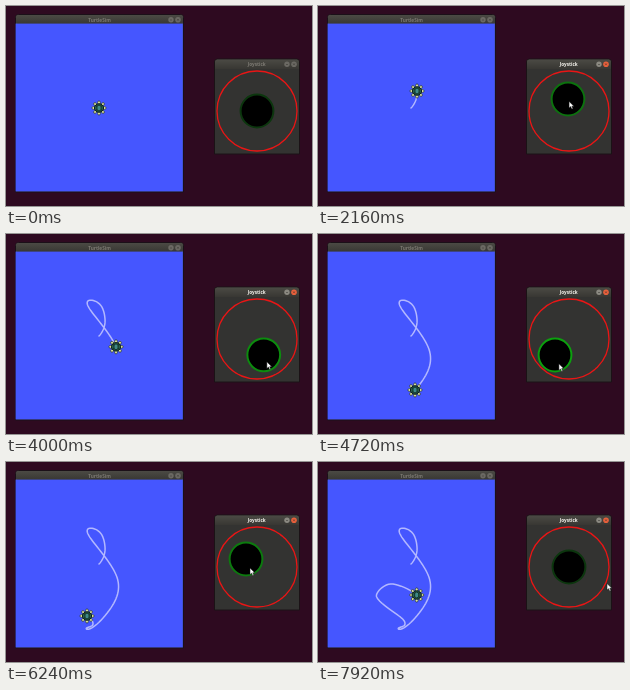
An HTML page that plays this animation: 306 by 200 pixels, repeating every 8 s.

```html
<!DOCTYPE html>
<html lang="en">
<head>
<meta charset="utf-8">
<title>Joystick control</title>
<style>
  html, body { margin: 0; width: 100%; height: 100%; overflow: hidden; background: #2e0a20; }
  svg { display: block; width: 306px; height: 200px; }
  text { font: bold 4.7px "Open Sans", "Noto Sans", sans-serif; text-anchor: middle; fill: #7d7a73; }
  .btn { fill: #6b6963; }
  .sign { fill: none; stroke: #302f2b; stroke-width: .5; }
  .focus text { fill: #f4f2ec; }
  .focus .btn { fill: #8b8981; }
  .focus .close { fill: #e8603c; }
</style>
</head>
<body>
<svg viewBox="0 0 306 200">
  <defs>
    <linearGradient id="bar" x2="0" y2="1">
      <stop offset="0" stop-color="#4b4a44"/>
      <stop offset="1" stop-color="#383733"/>
    </linearGradient>
  </defs>

  <rect width="306" height="200" fill="#2e0a20"/>

  <g id="sim">
    <path d="M9.5 186V11.5q0-3 3-3h162q3 0 3 3V186z" fill="url(#bar)" stroke="#1b1018"/>
    <rect x="10" y="9" width="167" height="9" rx="2" fill="url(#bar)"/>
    <rect x="9.6" y="17.6" width="167.2" height="167.8" fill="#4556ff"/>
    <text x="93.5" y="15.6">TurtleSim</text>
    <g class="buttons" transform="translate(172 13.8)"></g>
  </g>

  <polyline id="trail" fill="none" stroke="#b3b8ff" stroke-width="1.5" stroke-linejoin="round" stroke-linecap="round"/>

  <g id="turtle">
    <g id="legs" fill="#dfe5a6" stroke="#1c2c1a" stroke-width=".6"></g>
    <ellipse rx="4.6" ry="4.2" fill="#24604f" stroke="#0e1f18" stroke-width="1"/>
    <path d="M-2 -1.8L0 -3 2 -1.8V1.8L0 3-2 1.8zM-2 -1.8l-2-1M2 -1.8l2-1M-2 1.8l-2 1M2 1.8l2 1" fill="#3f8a86" stroke="#0e241e" stroke-width=".8"/>
  </g>

  <g id="pad">
    <path d="M208.5 148V56q0-3 3-3h79q3 0 3 3v92z" fill="#333331" stroke="#1b1216"/>
    <path d="M209 63v-7q0-2.5 2.5-2.5h79q2.5 0 2.5 2.5v7z" fill="url(#bar)"/>
    <text x="250.7" y="60">Joystick</text>
    <g class="buttons" transform="translate(288 58.3)"></g>
    <circle cx="251" cy="105" r="40" fill="none" stroke="#ea1515" stroke-width="1.3"/>
    <circle id="knob" r="16.4" fill="#000" stroke-width="2"/>
  </g>

  <path id="cursor" d="M0 0V6.6L1.6 5.2 2.7 7.7 3.9 7.1 2.8 4.8H4.9z" fill="#fff" stroke="#111" stroke-width=".5"/>
</svg>
<script>
const LOOP = 8000, STEP = 80, ENTER = 480, PRESS = 1200, RELEASE = 7680;
const GAIN = 0.004; // turtle px per ms for each px of knob offset
const HOME = [251, 105], OUTSIDE = [318, 130], EXIT = [289, 121.5];
const $ = id => document.getElementById(id);

// Time, turtle x, y, knob offset x, y
const keys = [
  [1500, 93, 102, 0, 0],
  [2160, 99, 85, -1, -12],
  [2850, 87, 66.5, -8, -2],
  [3280, 82, 72, 4, 8.5],
  [4100, 112, 119, 3, 15],
  [4720, 97, 156, -14, 16],
  [5200, 80.5, 167, -2, -2],
  [5850, 87, 162, 0, -3.5],
  [6240, 81, 154, -11, -8],
  [6900, 58.5, 134.5, -2, -6],
  [7360, 75, 122, 14, 2],
  [RELEASE, 98.7, 133, 18, 15]
];

const clamp = v => Math.min(1, Math.max(0, v));
const mix = (a, b, u) => a.map((v, i) => v + (b[i] - v) * u);
const place = (el, [x, y]) => el.setAttribute("transform", `translate(${x} ${y})`);

// The knob sets the turtle's velocity, so its offset is the slope of the path
function state(time) {
  const t = Math.min(RELEASE, Math.max(keys[0][0], time));
  const i = Math.max(1, keys.findIndex(k => k[0] >= t));
  const a = keys[i - 1], b = keys[i], span = b[0] - a[0], u = (t - a[0]) / span;
  const pos = [], push = [];
  for (const c of [1, 2]) {
    const d = b[c] - a[c], m = a[c + 2] * GAIN * span, n = b[c + 2] * GAIN * span;
    const p = 3 * d - 2 * m - n, q = m + n - 2 * d;
    pos.push(a[c] + u * (m + u * (p + u * q)));
    push.push((m + u * (2 * p + 3 * u * q)) / span / GAIN);
  }
  return { pos, push };
}

// The pointer slides towards the knob's edge while dragging
function pointer(t) {
  if (t < PRESS) return mix(OUTSIDE, HOME, clamp((t - ENTER) / (PRESS - ENTER)));
  const { push } = state(t), slide = clamp((t - PRESS) / 3600);
  const grip = [HOME[0] + push[0] + 4 * slide, HOME[1] + push[1] + 9 * slide];
  return mix(grip, EXIT, clamp((t - RELEASE) / (LOOP - STEP - RELEASE)));
}

for (const el of document.querySelectorAll(".buttons")) {
  el.innerHTML = `<circle class="btn" cx="-7" r="2.7"/><circle class="btn close" r="2.8"/>
    <path class="sign" d="M-8 .2h2M-.9 -.9l1.8 1.8M.9 -.9l-1.8 1.8"/>`;
}
for (let a = 0; a < 360; a += 45) {
  $("legs").innerHTML += `<ellipse cx="5.3" rx="1.8" ry="1.4" transform="rotate(${a})"/>`;
}

const trail = [];
for (let t = 0; t <= LOOP; t += STEP / 2) trail.push(state(t).pos.map(v => v.toFixed(2)).join());

function draw(t) {
  const { pos, push } = state(t);
  const offset = t >= PRESS && t < RELEASE ? push : [0, 0];
  const reach = Math.hypot(...offset);
  place($("turtle"), pos);
  $("trail").setAttribute("points", t > keys[0][0] ? trail.slice(0, t / STEP * 2 + 1).join(" ") : "");
  place($("knob"), [HOME[0] + offset[0], HOME[1] + offset[1]]);
  $("knob").setAttribute("stroke", `rgb(12 ${54 + 5 * reach} 14)`);
  place($("cursor"), pointer(t));
  $("pad").classList.toggle("focus", t >= PRESS);
}

const start = performance.now();
function tick() {
  const t = Math.max(0, performance.now() - start) % LOOP;
  draw(Math.floor(t / STEP) * STEP);
  requestAnimationFrame(tick);
}
draw(0);
requestAnimationFrame(tick);
</script>
</body>
</html>
```
